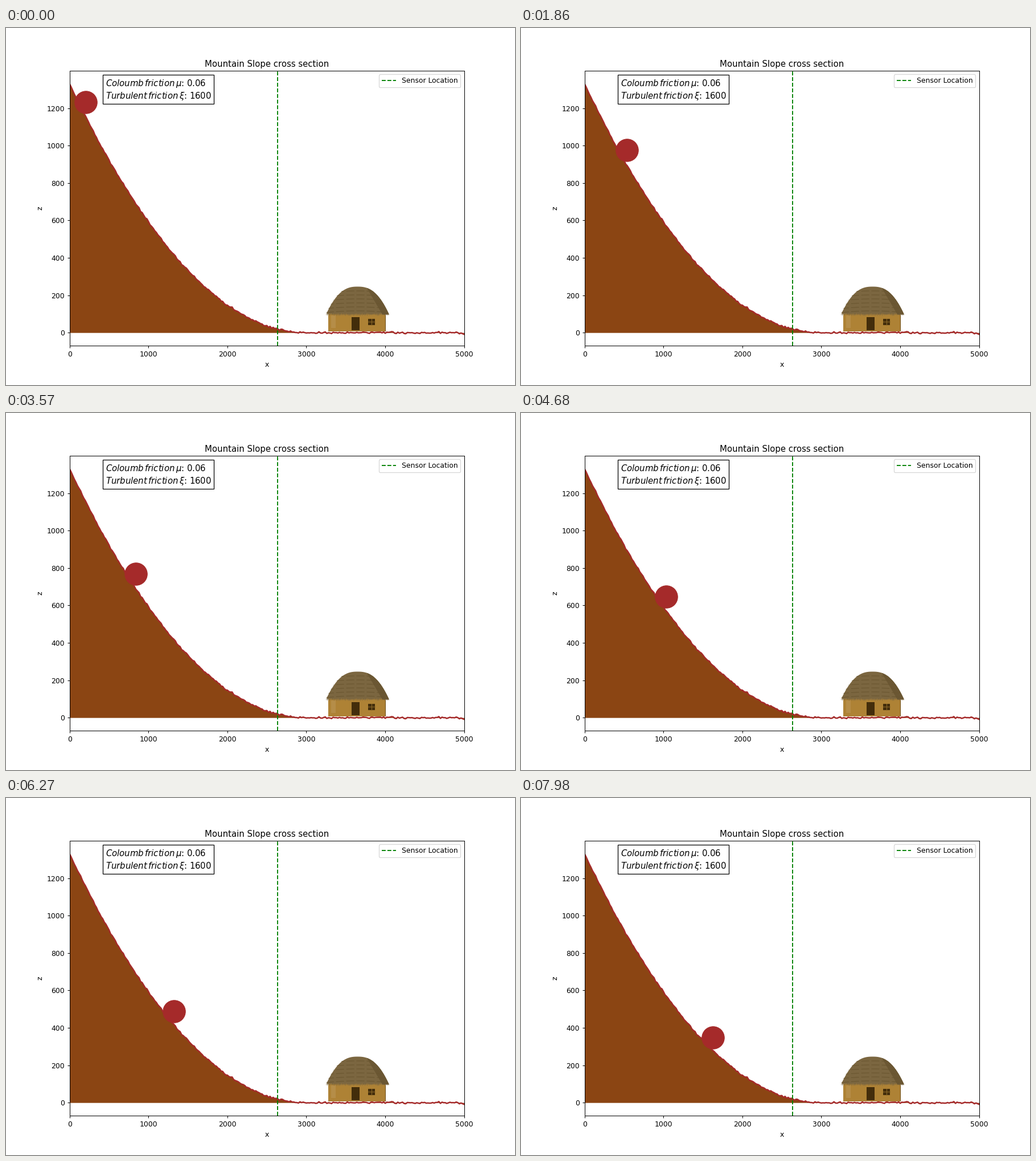
Animation of 894 by 626 pixels, one loop 8000 ms. Source, as a matplotlib script:

```python
import matplotlib.pyplot as plt
import numpy as np
from matplotlib.animation import FuncAnimation
from matplotlib.patches import Rectangle

W, H, DPI = 894, 626, 89.4
LOOP_MS, FRAMES = 8000, 267

rng = np.random.default_rng(7)
# The tiny margin keeps the pixel size from rounding down
fig, ax = plt.subplots(figsize=((W + 1e-6) / DPI, (H + 1e-6) / DPI), dpi=DPI)


def slope(x):
    return 1330 * np.clip(1 - x / 3000, 0, None) ** 2


def draw_section():
    x = np.arange(0, 5001, 20)
    z = slope(x) + rng.normal(0, 2.8, x.size)
    ax.fill_between(x, z, 0, color="saddlebrown", lw=0)
    ax.plot(x, z, color="brown", lw=2)
    ax.axvline(2635, color="green", ls="--", label="Sensor Location")
    ax.set(xlim=(0, 5000), ylim=(-70, 1400), xlabel="x", ylabel="z",
           title="Mountain Slope cross section")
    ax.set_yticks(range(0, 1201, 200))
    ax.legend(loc="upper right")


# Overlay whose units are stage pixels, y pointing down
stage = fig.add_axes([0, 0, 1, 1])
stage.set(xlim=(0, W), ylim=(H, 0))
stage.axis("off")


def box(x0, y0, x1, y1, color, **kw):
    stage.add_patch(Rectangle((x0, y0), x1 - x0, y1 - y0, fc=color, **kw))


def draw_hut():
    box(566, 498, 667, 532, "#ae8235")
    box(571, 504, 579, 526, "#b58d48")
    box(665.5, 500, 667, 532, "#6e4f1a")
    box(607, 507, 620.5, 530, "#432d0b")
    box(636, 510, 648, 521, "#432d0b")
    stage.plot([642, 642], [510, 521], color="#8f6b2a", lw=0.8)
    stage.plot([636, 648], [515.5, 515.5], color="#8f6b2a", lw=0.8)

    x = np.linspace(562, 672, 111)
    top = 501 - 48 * (1 - np.abs((x - 617) / 55) ** 2.5)
    fringe = 502 + 2 * (-1) ** np.arange(x.size) + rng.uniform(-1, 1, x.size)
    roof = stage.fill_between(x, top, fringe, color="#7b6640", lw=0)
    shade = np.clip(455 + 1.7 * (x - 633), top, 502)
    stage.fill_between(x, top, shade, color="#6b5733", lw=0)
    for y in range(461, 500, 7):
        strand, = stage.plot(x, y + 0.001 * (x - 617) ** 2, color="#69552f",
                             lw=0.8, dashes=(14, 4))
        strand.set_clip_path(roof.get_paths()[0], stage.transData)


def draw_note():
    box(169.5, 82, 365, 133, "white", ec="black", lw=1)
    stage.text(174.5, 101.5, r"$Coloumb\,friction\,\mu$: 0.06", fontsize=12)
    stage.text(174.5, 123.5, r"$Turbulent\,friction\,\xi$: 1600", fontsize=12)


draw_section()
draw_hut()
draw_note()
ball = ax.scatter([], [], s=1000, color="brown")


def update(i):
    x = 203 + 5.34 * i
    lift = np.interp(i, [140, 210], [78, 69.5])
    ball.set_offsets([[x, slope(x) + lift]])
    return (ball,)


anim = FuncAnimation(fig, update, frames=FRAMES, interval=LOOP_MS / FRAMES,
                     repeat=True, repeat_delay=0)
plt.show()
```
